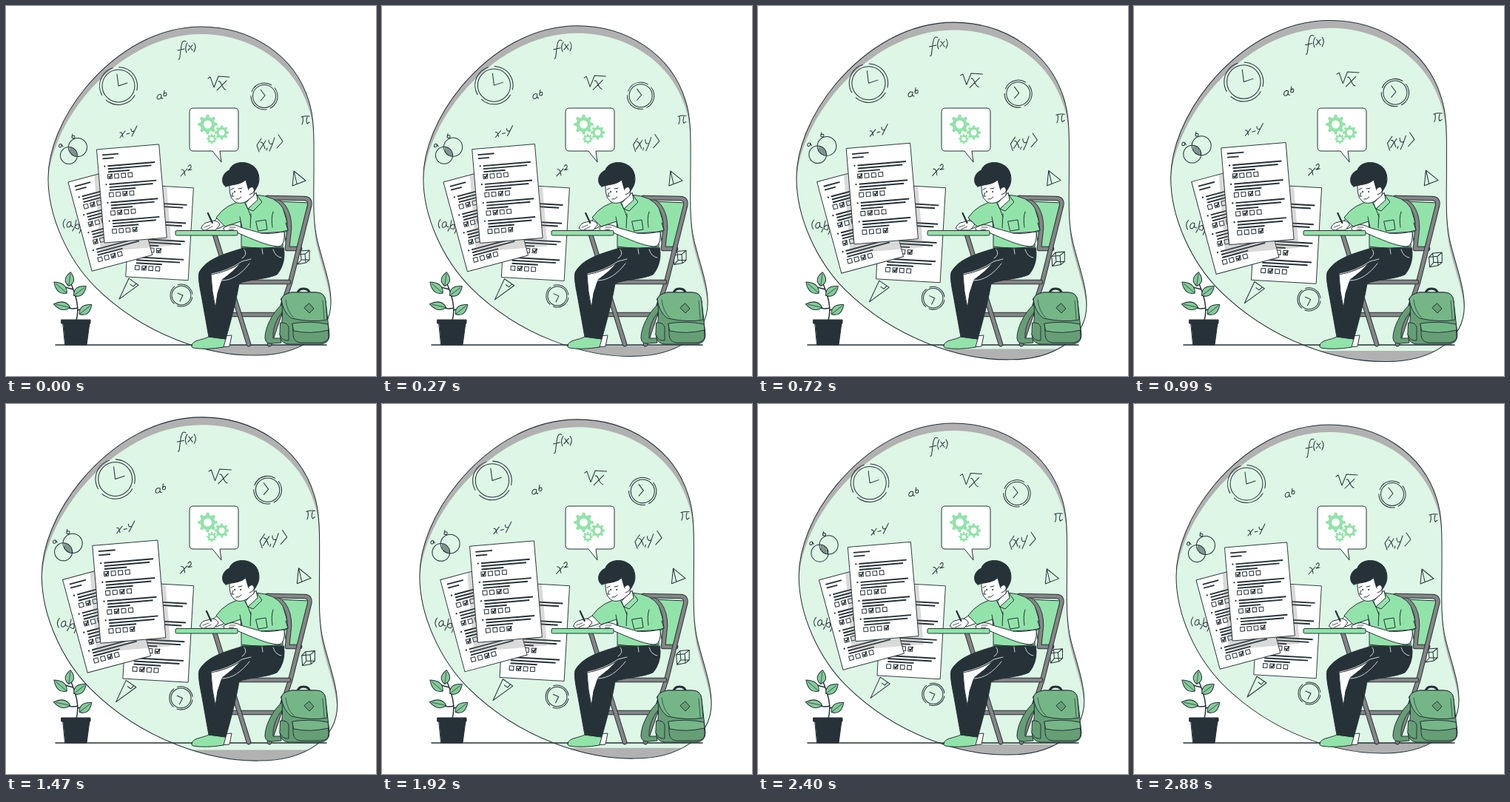
These frames come from a looping animation (500 by 500 pixels, 2910 ms). An HTML page:

```html
<!DOCTYPE html>
<html lang="en">
<head>
<meta charset="utf-8">
<title>Student writing a test</title>
<style>
html, body { margin: 0; width: 100%; height: 100%; overflow: hidden; background: #fff; }
svg { display: block; width: 100vw; height: 100vh; }
.ink { fill: none; stroke: #263238; stroke-width: 1; stroke-linecap: round; stroke-linejoin: round; }
.art { stroke: #263238; stroke-width: 1; stroke-linecap: round; stroke-linejoin: round; }
.thin { fill: none; stroke: #fff; stroke-width: .8; }
</style>
</head>
<body>
<svg viewBox="0 0 500 500">
  <defs>
    <path id="blob" d="M264 28C330 28 390 66 409 128C417 152 416 180 416 215C416 260 414 290 421 318C429 350 439 375 439 400C439 445 395 472 338 472C275 473 188 446 121 380C84 343 57 285 57 233C57 195 75 150 108 110C150 60 205 28 264 28Z"/>
    <clipPath id="inside"><use href="#blob"/></clipPath>
    <clipPath id="sheets">
      <rect width="84" height="124.5" transform="translate(84 238) rotate(-15)"/>
      <rect width="84" height="125" transform="translate(169 241) rotate(3.3)"/>
    </clipPath>
  </defs>

  <g id="scene">
    <use href="#blob" fill="#b1b1b1"/>
    <g clip-path="url(#inside)">
      <use href="#blob" y="10" fill="#ddf6e5"/>
      <path d="M50 458H450V480H50Z" fill="#b1b1b1"/>
    </g>
    <use href="#blob" class="ink"/>
    <g class="ink">
      <path d="M243 48C238 45 237 52 236 60S235 73 233 72M232 60L241 58M245 50Q241 56 244 63M247 53L252 60M252 53L246 60M254 50Q258 55 254 62"/>
      <path d="M273 98L276 96L281 110L287 95L302 96M287 102C291 100 292 113 297 113M298 101L285 114"/>
      <path d="M210 120C205 117 202 126 206 126S210 122 210 120Q209 126 212 125M214 114L213 121Q217 123 217 119T213 119"/>
      <path d="M154 171Q157 170 158 177M161 169L154 178M163 173L167 172M169 166Q169 171 173 169M177 162Q173 170 170 176"/>
      <path d="M237 221Q241 220 242 229M245 220L236 230M246 217Q249 213 250 216T246 222L251 221"/>
      <path d="M345 179L339 188L342 197M344 184Q347 183 350 193M351 182L343 194M353 192L352 195M355 181Q355 188 360 186M363 178Q360 188 356 196M368 174L374 183L366 192"/>
      <path d="M80 288Q75 294 79 300M88 292C83 289 80 299 84 299S88 294 88 292Q87 299 91 298M92 300L90 304M95 289L93 299Q99 304 99 298T94 297M100 291Q104 298 99 307"/>
      <path d="M399 150Q404 148 410 149M401 150Q402 156 400 160M407 150Q405 156 407 159L410 157"/>
      <path d="M389 223L405 236L387 243ZM389 223L393 240"/>
      <path d="M393 336L404 335L405 347L394 349ZM393 336L398 331L410 330L404 335M410 330L410 343L405 347M398 331L399 343L394 349M399 343L410 343"/>
      <path d="M166 368L179 377L153 396ZM176 375L172 379L168 376"/>
      <circle cx="97" cy="191" r="12.5"/><circle cx="85" cy="202" r="11.5"/>
      <path d="M87 191V198M89 191V201M91 192V202M93 194V203M95 197V203M75 187C72 185 70 191 73 191S75 188 75 187L77 190M90 173L89 178Q93 180 93 177T89 176"/>
    </g>
    <g id="clocks" class="ink"></g>
    <g id="papers"></g>
  </g>

  <path d="M67 458H433" class="ink" style="stroke-width:1.6"/>

  <path d="M248 143Q248 138 253 138H309Q314 138 314 143V191Q314 196 309 196H289L291 211L279 196H253Q248 196 248 191Z" fill="#fff" class="art"/>
  <g id="gears" fill="#92e3a9" fill-rule="evenodd"></g>

  <g id="plant" class="art">
    <path d="M95 425C100 407 94 390 87 373M97 408Q84 411 77 404M97 411L107 408M94 393L101 386M91 383L76 379" fill="none" stroke-width="1.5"/>
    <path d="M77 428H113L109 458H80Z" fill="#263238"/>
    <path d="M75 424H114V429H75Z" fill="#263238"/>
  </g>

  <!-- chair -->
  <g class="art">
    <path d="M368 264L409 266L398 326H380Z" fill="#92e3a9"/>
    <g id="bars" fill="none"></g>
  </g>

  <!-- legs and shoe -->
  <g class="art">
    <path d="M292 446L305 445L302 460L290 461Z" fill="#fff"/>
    <path d="M251 459C252 451 264 452 274 447L297 450L294 461Q270 465 253 462Q250 461 251 459Z" fill="#92e3a9"/>
    <path d="M318 326H375C378 340 374 354 366 363C350 370 329 369 315 375C311 399 304 425 297 450L274 447L264 391Q259 368 261 360C270 343 291 336 318 328Z" fill="#263238"/>
    <path d="M277 363Q300 359 318 347Q306 360 292 370L286 388L283 408Q278 386 277 363Z" fill="#fff"/>
    <path d="M278 362Q300 358 319 345L331 342M291 371C306 371 318 362 329 348M361 329Q364 339 372 340M322 329Q327 336 319 341M346 328L347 335" class="thin"/>
    <path d="M318 326H375" stroke="#92e3a9" stroke-width=".8"/>
  </g>

  <!-- torso -->
  <g class="art">
    <path id="arm" fill="#fff"/>
    <path d="M322 263L337 255Q365 257 374 273Q380 288 381 303L374 307V325Q346 329 318 325V305L317 291L296 298L284 286Q297 267 322 263Z" fill="#92e3a9"/>
    <path d="M324 266L338 252L340 262L327 274Z" fill="#fff"/>
    <path d="M322 265L327 274L331 285M338 254L346 265L334 277L327 274M338 291L351 289L353 302L341 304ZM331 281L330 300M361 278Q358 286 360 299M319 299L316 285" fill="none"/>
    <path d="M294 300C301 295 309 294 317 299L345 307L376 305C377 318 374 325 367 325C352 324 331 314 314 307L306 303L296 304Z" fill="#fff"/>
    <path d="M345 307Q362 309 381 303L378 293" fill="none"/>
    <path d="M302 299L310 299M301 302L308 302" fill="none" stroke-width=".8"/>
  </g>

  <!-- head -->
  <g class="art">
    <path d="M302 238C302 248 302 258 307 262C311 268 319 267 325 264L335 256L336 243L326 233Z" fill="#fff"/>
    <path d="M297 244C290 240 291 226 302 222C304 212 321 208 332 215C342 220 344 235 340 243L336 250L328 249C326 243 325 239 324 235C316 242 305 241 297 244Z" fill="#263238"/>
    <path d="M328 247Q333 242 335 247T329 255" fill="#fff"/>
    <path d="M304 248L308 246M314 247L319 246M307 252L305 257L308 257M311 261Q315 262 318 258" fill="none"/>
    <circle cx="309" cy="251" r=".5"/><circle cx="317" cy="251" r=".5"/>
  </g>

  <g id="hand" class="art">
    <path d="M264 300Q266 293 274 292L281 290Q288 291 289 296L283 303H268Z" fill="#fff"/>
    <path d="M268 299L276 296M271 302L279 298" fill="none" stroke-width=".8"/>
    <path d="M273 280L279 293" stroke-width="2.2"/>
  </g>
  <rect x="229" y="303.5" width="84" height="6.5" rx="1.5" fill="#92e3a9" class="art"/>

  <!-- backpack -->
  <g class="art">
    <path d="M379 398C362 410 350 433 350 449Q351 457 360 456L372 455L371 449H361C360 430 371 412 382 407Z" fill="#669f76"/>
    <path d="M394 390Q394 382 402 382T411 390" fill="none" stroke-width="3"/>
    <path d="M372 396Q374 389 386 387H419Q431 387 432 399L437 444Q437 456 425 457H382Q371 456 370 444Q376 420 372 396Z" fill="#669f76"/>
    <path d="M372 396Q374 389 386 387H419Q431 387 432 399L434 424Q413 428 386 422Q374 414 372 396Z" fill="#75b687"/>
    <path d="M388 430Q411 427 435 431L436 447Q435 455 424 455H398Q388 454 388 444Z" fill="#669f76"/>
    <path d="M387 429Q411 425 435 430L436 438Q410 444 389 439Z" fill="#75b687"/>
    <path d="M371 428Q380 427 382 434V452Q373 453 370 444Z" fill="#669f76"/>
    <path d="M410 402L416 409L410 415L403 408Z" fill="#669f76"/>
    <path d="M378 397Q380 414 389 421M428 398L430 423" fill="none" stroke-width=".7"/>
  </g>
</svg>
<script>
const $ = id => document.getElementById(id);
const INK = "#263238";
const add = (id, html) => $(id).insertAdjacentHTML("beforeend", html);

function clock(x, y, r, hands, turn) {
  const d = r * 2 * Math.PI / 3;
  add("clocks", `<g transform="translate(${x} ${y})">
    <circle r="${r}" stroke-dasharray="${d * .84} ${d * .16}" transform="rotate(${turn})"/>
    <circle r="${r * .86}"/><path d="${hands}"/></g>`);
}
clock(152, 108, 25.5, "M-2 -16L0 0L12 -4", 30);
clock(349, 122, 18, "M-5 -9L1 -1L-5 6", 80);
clock(237, 391, 15, "M-5 -3L2 0L-2 8", 10);

// A sheet with four questions; checks holds the ticked box of each row
function paper(x, y, turn, height, checks) {
  let s = `<rect width="84.5" height="${height}" fill="#fff" stroke="${INK}" stroke-width=".9"/>
    <path d="M7 8H29M7 13H22" stroke="${INK}" stroke-width="1.8"/>`;
  checks.forEach((tick, row) => {
    const q = 23.5 + row * 24.7;
    s += `<circle cx="9" cy="${q}" r="1.1" fill="${INK}"/>
      <path d="M13 ${q}H77M13 ${q + 4}H72M13 ${q + 8}H${row % 2 ? 48 : 42}" stroke="${INK}" stroke-width="1.9"/>`;
    for (let i = 0; i < 4; i++) {
      const bx = 12 + i * 9.2, by = q + 11.5;
      s += `<rect x="${bx}" y="${by}" width="5.6" height="5.6" fill="#fff" stroke="${INK}"/>`;
      if (i === tick) s += `<path d="M${bx + 1} ${by + 2.5}l1.8 2l3.4 -5" fill="none" stroke="${INK}" stroke-width="1.7"/>`;
    }
  });
  add("papers", `<g transform="translate(${x} ${y}) rotate(${turn})">${s}</g>`);
}
paper(169, 241, 3.3, 125, [1, 2, 3, 1]);
paper(84, 238, -15, 124.5, [1, 0, 0, 2]);
add("papers", `<g clip-path="url(#sheets)"><rect x="-6" y="0" width="96" height="138" fill="#777" opacity=".28"
  transform="translate(122.5 194) rotate(-4.8)"/></g>`);
paper(122.5, 194, -4.8, 126.5, [0, 2, 1, 3]);

function gear(x, y, r, teeth, hole) {
  const pts = [];
  for (let i = 0; i < teeth; i++)
    for (const [k, q] of [[-.3, .76], [-.18, 1], [.18, 1], [.3, .76]]) {
      const a = (i + k) * 2 * Math.PI / teeth;
      pts.push([x + r * q * Math.cos(a), y + r * q * Math.sin(a)].map(v => v.toFixed(2)));
    }
  add("gears", `<path d="M${pts.join("L")}ZM${x - hole} ${y}a${hole} ${hole} 0 1 0 ${2 * hole} 0a${hole} ${hole} 0 1 0 ${-2 * hole} 0Z"/>`);
}
gear(272.5, 160, 13.3, 8, 5.5);
gear(291.5, 171, 9.7, 8, 4);
gear(278, 179.5, 6.8, 8, 2.8);

function leaf(x, y, length, width, turn) {
  const h = length / 2;
  add("plant", `<g transform="translate(${x} ${y}) rotate(${turn})">
    <path d="M${-h} 0Q${-h / 4} ${-width} ${h} 0Q${-h / 4} ${width} ${-h} 0Z" fill="#83cc98"/>
    <path d="M${-h} 0H${h * .7}" stroke-width=".7"/></g>`);
}
leaf(73.5, 380.5, 23, 11.5, -139);
leaf(86, 369, 19, 11.5, -83);
leaf(100, 385, 21, 11.5, -37);
leaf(75.5, 405, 23, 10.5, -168);
leaf(107.5, 410, 21, 11.5, -38);

// Outlined grey tubes of the chair
for (const d of ["M304 417H370", "M282 309L328 457", "M354 259C372 262 383 275 383 300L380 328H397",
                 "M353 259L404 260Q412 261 410 270L384 374L356 457", "M284 373H382"])
  add("bars", `<path d="${d}" stroke-width="6.6"/><path d="${d}" stroke="#858585" stroke-width="4.6"/>`);

const LOOP = 2910;
const wave = (t, peak) => Math.cos(2 * Math.PI * (t - peak) / LOOP);

function draw(now) {
  const t = now % LOOP;
  const scale = 1 + .046 * (1 + wave(t, 1380)) / 2;
  $("scene").setAttribute("transform", `translate(248 250.5) scale(${scale}) translate(-248 -250.5)`);
  const dx = -1 + 4.6 * wave(t, 640);
  $("hand").setAttribute("transform", `translate(${dx} 0)`);
  $("arm").setAttribute("d", `M${281 + dx} 291L288 284L299 295L${286 + dx} 301Z`);
  requestAnimationFrame(draw);
}
draw(0);
</script>
</body>
</html>
```
